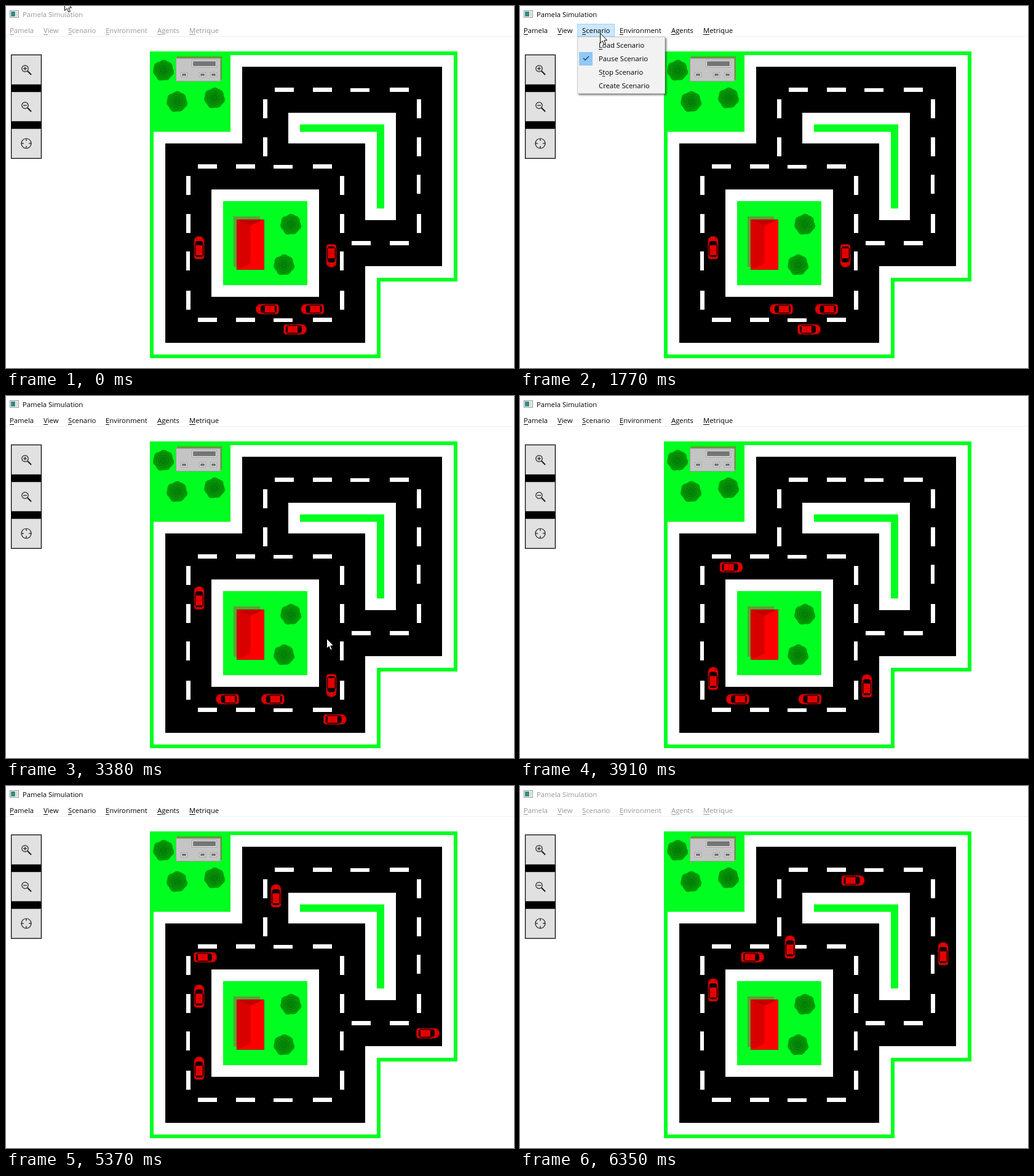
Animation of 826x590 px, one loop 6.45 s. Source, as an HTML page with a canvas:

```html
<!DOCTYPE html>
<html lang="en">
<head>
<meta charset="utf-8">
<title>Pamela Simulation</title>
<style>
  html, body { margin: 0; width: 100%; height: 100%; overflow: hidden; background: #fff; }
  canvas { display: block; }
</style>
</head>
<body>
<canvas id="stage" width="826" height="590"></canvas>
<script>
const LOOP = 6450;
const GREEN = '#00ff21', SELECT = '#90c8f6', SHADE = '#5d9f33', INK = '#1a1a1a';
const FONT = '11.3px "Open Sans", "Noto Sans", sans-serif';
const screen2d = document.getElementById('stage').getContext('2d');
let g = screen2d;

// Drawing helpers
function rect(x, y, w, h, color) {
  g.fillStyle = color;
  g.fillRect(x, y, w, h);
}

function frame(x, y, w, h, color) {
  g.strokeStyle = color;
  g.lineWidth = 1;
  g.strokeRect(x + .5, y + .5, w - 1, h - 1);
}

function poly(points, color) {
  g.beginPath();
  points.forEach(([x, y]) => g.lineTo(x, y));
  g.closePath();
  g.fillStyle = color;
  g.fill();
}

function line(points, color, width) {
  g.beginPath();
  points.forEach(([x, y]) => g.lineTo(x, y));
  g.strokeStyle = color;
  g.lineWidth = width;
  g.stroke();
}

function textWidth(text) {
  g.font = FONT;
  return Math.round(g.measureText(text).width);
}

// Text with one underlined letter
function label(text, x, y, color, key = -1) {
  g.font = FONT;
  g.fillStyle = color;
  g.fillText(text, x, y);
  if (key >= 0) g.fillRect(x + textWidth(text.slice(0, key)), y + 2, textWidth(text[key]), 1);
}

// Scenery: the map is laid out on a grid of small square units
const UNIT = 6.25, LEFT = 234, TOP = 74;
const gridX = u => Math.round(LEFT + u * UNIT);
const gridY = u => Math.round(TOP + u * UNIT);

function block(x, y, w, h, color) {
  rect(gridX(x), gridY(y), gridX(x + w) - gridX(x), gridY(y + h) - gridY(y), color);
}

function roadLoop(x, y) {
  block(x, y, 52, 52, '#000');
  block(x + 12, y + 12, 28, 28, '#fff');
  block(x + 15, y + 15, 22, 22, GREEN);
}

// Lane marks every ten units; the third of a full line is slightly off
function marks(x, y, count, vertical) {
  for (let i = 0; i < count; i++) {
    const odd = i === 2 ? 1 : 0;
    const along = 10 * i * UNIT - 2 * odd;
    const px = LEFT + x * UNIT, py = TOP + y * UNIT;
    if (vertical) rect(Math.floor(px - 3), Math.floor(py - 15.6 + along), 7 - odd, 31, '#fff');
    else rect(Math.floor(px - 15.6 + along), Math.floor(py - 3) + odd, 31, 7 - odd, '#fff');
  }
}

function blob(x, y, r, color, phase) {
  g.beginPath();
  for (let i = 0; i < 48; i++) {
    const a = i * Math.PI / 24;
    const d = r * (.96 + .04 * Math.sin(7 * a + phase) + .02 * Math.sin(4 * a));
    g.lineTo(x + d * Math.cos(a), y + d * Math.sin(a));
  }
  g.closePath();
  g.fillStyle = color;
  g.fill();
  g.strokeStyle = 'rgba(0,80,0,.35)';
  g.lineWidth = .7;
  g.stroke();
}

function tree(x, y) {
  for (let i = 0; i < 4; i++) blob(x, y, 17 - 4 * i, `rgb(5,${156 - 9 * i},7)`, 2 * i);
}

function house(x, y, w, h) {
  rect(x - 5, y - 5, w - 2, h, SHADE);
  rect(x, y, w, h, '#ff0000');
  const ridge = x + w / 2;
  poly([[x, y], [ridge, y + 10], [ridge, y + h - 10], [x, y + h]], '#d90000');
  poly([[x, y], [x + w, y], [ridge, y + 10]], '#c00000');
  frame(x, y, w, h, 'rgba(150,0,0,.4)');
}

function pane(x, y, w, h) {
  rect(x, y, w, h, '#f4f4f4');
  rect(x + 2, y + 2, w - 4, h - 4, '#757575');
  frame(x, y, w, h, '#a0a0a0');
}

function office(x, y) {
  rect(x + 2, y - 3, 73, 38, SHADE);
  rect(x, y, 73, 38, '#c4c4c4');
  frame(x, y, 73, 38, '#9c9c9c');
  pane(x + 26, y + 3, 41, 12);
  [8, 38, 56].forEach(d => pane(x + d, y + 23, 11, 8));
}

function map() {
  block(0, 0, 80, 60, GREEN);
  block(0, 0, 60, 80, GREEN);
  block(1, 1, 78, 58, '#fff');
  block(1, 1, 58, 78, '#fff');
  block(0, 0, 21, 21, GREEN);
  roadLoop(24, 4);
  block(39, 21, 20, 20, '#fff');
  roadLoop(4, 24);

  marks(35, 10, 4);
  marks(55, 50, 2);
  marks(30, 15, 2, true);
  marks(70, 15, 4, true);
  for (const side of [0, 40]) {
    marks(15, 30 + side, 4);
    marks(10 + side, 35, 4, true);
  }
  house(375, 348, 45, 82);
  office(276, 85);
  [[256, 105], [278, 156], [339, 150], [463, 356], [452, 422]].forEach(p => tree(...p));
}

// Window parts
function ring(x, y, r) {
  g.beginPath();
  g.arc(x, y, r, 0, 7);
  g.strokeStyle = INK;
  g.lineWidth = 1.2;
  g.stroke();
}

function magnifier(x, y, plus) {
  ring(x - 2, y - 2, 5.2);
  line([[x + 2, y + 2], [x + 8, y + 8]], INK, 2);
  line([[x - 5, y - 2], [x + 1, y - 2]], INK, 1.2);
  if (plus) line([[x - 2, y - 5], [x - 2, y + 1]], INK, 1.2);
}

function crosshair(x, y) {
  ring(x, y, 8);
  for (let a = 0; a < 4; a++) {
    const c = Math.cos(a * Math.PI / 2), s = Math.sin(a * Math.PI / 2);
    line([[x + 8 * c, y + 8 * s], [x + 4 * c, y + 4 * s]], INK, 1.2);
  }
}

function toolbar() {
  rect(8, 79, 50, 170, '#000');
  for (let i = 0; i < 3; i++) {
    rect(9, 80 + 60 * i, 48, 48, '#e1e1e1');
    frame(9, 80 + 60 * i, 48, 48, '#adadad');
  }
  magnifier(33, 104, true);
  magnifier(33, 164, false);
  crosshair(33, 224);
}

function windowIcon() {
  rect(6, 7, 15, 12, '#fff');
  rect(8, 9, 7, 8, '#368b80');
  rect(16, 9, 3, 8, '#d5d9dc');
  frame(6, 7, 15, 12, '#8c9499');
}

// Menus
const NAMES = ['Pamela', 'View', 'Scenario', 'Environment', 'Agents', 'Metrique'];
const VIEW = { items: [['Zoom In'], ['Zoom Out'], ['Center View'], ['Full View']] };
const SCENARIO = { checked: 1,
  items: [['Load Scenario', 0], ['Pause Scenario'], ['Stop Scenario', 1], ['Create Scenario']] };

// Which menu is open or hovered, and its selected row
function menuState(t) {
  if (t < 710 || t >= 2660) return {};
  if (t < 970) return { name: 'View', hover: t < 850 };
  if (t < 1770) return { name: 'View', menu: VIEW, row: t < 1620 ? -1 : 0 };
  return { name: 'Scenario', menu: SCENARIO, row: t < 2160 ? -1 : t < 2300 ? 0 : 1 };
}

function menuBar(t) {
  const color = t >= 850 && t < 6350 ? '#000' : '#979797';
  const { name, hover, menu, row } = menuState(t);
  label('Pamela Simulation', 27, 18, color);
  let x = 6;
  for (const text of NAMES) {
    const w = textWidth(text) + 16;
    if (text === name) {
      rect(x - 8, 29, w, 21, hover ? '#e5f3ff' : '#cce8ff');
      frame(x - 8, 29, w, 21, hover ? '#cce8ff' : '#99d1ff');
      if (menu) dropdown(menu, x - 8, row);
    }
    label(text, x, 44, color, 0);
    x += w;
  }
}

function dropdown({ items, checked }, x, row) {
  const w = 60 + Math.max(...items.map(([text]) => textWidth(text)));
  g.save();
  g.shadowColor = 'rgba(0,0,0,.55)';
  g.shadowBlur = 3;
  g.shadowOffsetX = g.shadowOffsetY = 2;
  rect(x, 50, w, 93, '#f2f2f2');
  g.restore();
  frame(x, 50, w, 93, '#ccc');
  items.forEach(([text, key], i) => {
    const y = 53 + 22 * i;
    if (i === row) rect(x + 3, y, w - 6, 22, SELECT);
    if (i === checked) {
      rect(x + 3, y, 22, 22, SELECT);
      line([[x + 10, y + 10], [x + 13, y + 13], [x + 19, y + 7]], '#1f3b57', 1.4);
    }
    label(text, x + 35, y + 15, '#000', key);
  });
}

// Pointer: time and place of each stop
const STOPS = [[0, 95, -9], [400, 46, 26], [710, 74, 36], [1370, 74, 36], [1620, 80, 66],
  [1770, 130, 44], [2420, 136, 84], [2900, 136, 84], [3780, 840, 653]];

function pointer(t) {
  const i = STOPS.findIndex(stop => stop[0] > t);
  if (i < 0) return;
  const [t0, x0, y0] = STOPS[i - 1], [t1, x1, y1] = STOPS[i];
  const k = (t - t0) / (t1 - t0);
  g.save();
  g.translate(Math.round(x0 + (x1 - x0) * k) + .5, Math.round(y0 + (y1 - y0) * k) + .5);
  poly([[0, 0], [0, 16], [3.7, 12.6], [6.3, 18.5], [8.8, 17.4], [6.3, 11.7], [11, 11.3]], '#fff');
  g.strokeStyle = '#000';
  g.lineWidth = 1;
  g.stroke();
  g.restore();
}

// Cars: four share one lane, each from its own starting distance
const LANE = [[529, 407], [529, 494], [314, 494], [314, 279], [439, 279], [439, 154], [700, 154]];
const DETOUR = [[470, 527], [564, 527], [564, 403], [688, 403], [688, 154]];
const START = 2770, STEP = 123.4, STRIDE = 15.95, LEFT_TURN_SKIP = 4;

function travelled(t) {
  return t < START ? 0 : 1 + STRIDE * Math.floor((t - START) / STEP);
}

// Cars hop a little ahead after each left turn
function place(route, s) {
  let before = [0, 0];
  for (let i = 1; i < route.length; i++) {
    const [x0, y0] = route[i - 1], [x1, y1] = route[i];
    const length = Math.hypot(x1 - x0, y1 - y0);
    const ux = (x1 - x0) / length, uy = (y1 - y0) / length;
    if (before[0] * uy - before[1] * ux < 0) s += LEFT_TURN_SKIP;
    if (s <= length || i === route.length - 1) return [x0 + ux * s, y0 + uy * s, Math.atan2(uy, ux)];
    s -= length;
    before = [ux, uy];
  }
}

function car(x, y, angle) {
  g.save();
  g.translate(x, y);
  g.rotate(angle);
  rect(4, -9, 2, 18, '#c00000');
  g.beginPath();
  g.roundRect(-18.5, -8, 37, 16, [4, 7, 7, 4]);
  g.fillStyle = '#e60000';
  g.fill();
  g.strokeStyle = '#8a0000';
  g.lineWidth = 1;
  g.stroke();
  poly([[4, -5], [9, -6.5], [11, -3], [11, 3], [9, 6.5], [4, 5]], '#080000');
  poly([[-15, -5.5], [-12, -4.5], [-12, 4.5], [-15, 5.5]], '#080000');
  for (const side of [-1, 1]) {
    line([[-13, 6.3 * side], [6, 6.3 * side]], '#180000', 1.4);
    line([[12, 5.2 * side], [17, 3.7 * side]], '#a00000', .8);
  }
  line([[-4, -6], [-4, 6]], '#b00000', .8);
  g.restore();
}

function traffic(t) {
  const s = travelled(t);
  [0, 117.5, 191, 402].forEach(lead => car(...place(LANE, lead + s)));
  car(...place(DETOUR, s));
}

const backdrop = document.createElement('canvas');
backdrop.width = 826;
backdrop.height = 590;
g = backdrop.getContext('2d');
rect(0, 0, 826, 590, '#fff');
rect(0, 49, 826, 1, '#f0f0f0');
windowIcon();
toolbar();
map();
g = screen2d;

const start = performance.now();
function loop() {
  const t = Math.max(0, performance.now() - start) % LOOP;
  g.drawImage(backdrop, 0, 0);
  traffic(t);
  menuBar(t);
  pointer(t);
  requestAnimationFrame(loop);
}
loop();
</script>
</body>
</html>
```
